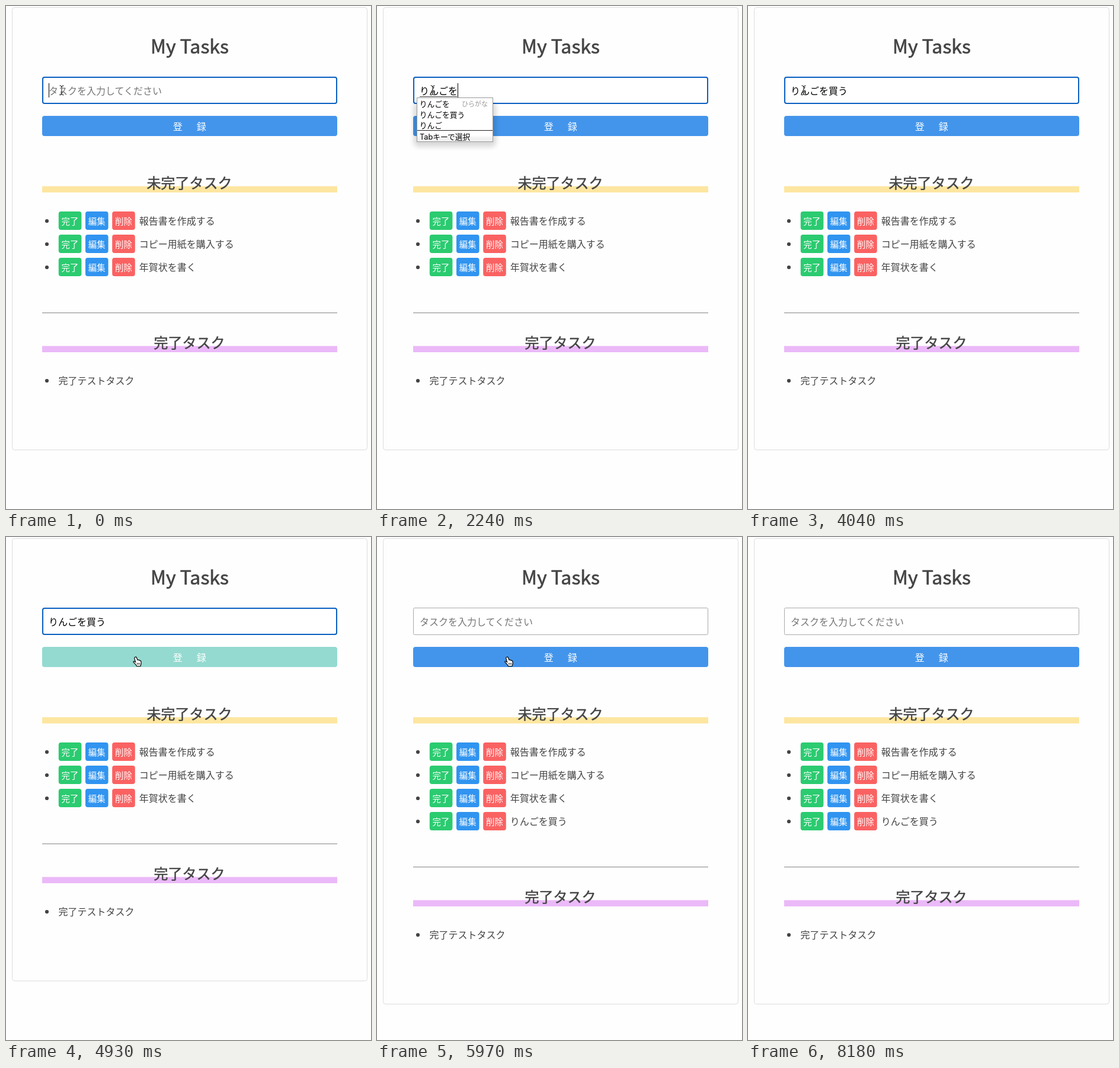
Animation of 616x847 px, one loop 9220 ms. Source, as an HTML page:

```html
<!DOCTYPE html>
<html lang="ja">
<head>
<meta charset="utf-8">
<title>My Tasks</title>
<style>
html, body { margin: 0; width: 100%; height: 100%; overflow: hidden; background: #fefefe; }
svg { display: block; width: 616px; height: 847px; }
text { font-family: "Noto Sans CJK JP", "Noto Sans CJK", sans-serif; font-size: 16px; fill: #444; white-space: pre; }
.h1, .h2 { text-anchor: middle; stroke: #444; }
.h1 { font-size: 32px; stroke-width: .7px; }
.h2 { font-size: 24px; stroke-width: .5px; }
.white { fill: #fff; }
.small { font-size: 14.4px; }
.pop { font-family: Inter, "Noto Sans CJK JP", "Noto Sans CJK", sans-serif; font-size: 12.75px; fill: #000; }
.note { font-size: 11px; fill: #999; }
</style>
</head>
<body>
<svg id="stage" viewBox="0 0 616 847">
  <defs>
    <filter id="blur" x="-20%" y="-40%" width="140%" height="180%"><feGaussianBlur stdDeviation="4"/></filter>
    <linearGradient id="sheet" x2="0" y2="1">
      <stop offset=".85" stop-color="#fff"/><stop offset=".92" stop-color="#f1f1f1"/>
    </linearGradient>
    <g id="beam" fill="none">
      <path d="M-3.5-8Q0-8 0-5.5Q0-8 3.5-8M0-6V6M-3.5 8Q0 8 0 5.5Q0 8 3.5 8M-2 3H2" stroke="#fff" stroke-width="2.4" opacity=".7"/>
      <path d="M-3.5-8Q0-8 0-5.5Q0-8 3.5-8M0-6V6M-3.5 8Q0 8 0 5.5Q0 8 3.5 8M-2 3H2" stroke="#111"/>
    </g>
    <g id="hand">
      <path d="M4 1.2c1.2-.6 2 0 2.4 1L8 6c.8-.6 1.8-.3 2 .4.8-.4 1.6 0 1.9.7.9-.2 1.7.3 1.9 1.2.4 1.6.5 3 .1 4.8-.3 1-.8 1.5-.9 3.4H6.5c-.5-1.6-1.6-2.6-2.6-3.8C2.8 11.6 1.8 10.6 1 9.6c-.6-1 .6-1.9 1.7-1.2L4.5 9.6 2.8 3.4C2.5 2.4 3.1 1.5 4 1.2Z" fill="#fff" stroke="#000" stroke-width="1.2"/>
      <path d="M7.4 11v3M9.4 11v3M11.4 11v3" stroke="#000" stroke-width=".8"/>
    </g>
    <g id="arrow">
      <path d="M1 2V16L4 13.2 6.2 18.2 8.8 17 6.6 12.4H11Z" opacity=".2"/>
      <path d="M.5.5V14.6L3.7 11.7 5.9 16.9 8.5 15.8 6.3 10.8H10.4Z" stroke="#fff"/>
    </g>
  </defs>
  <rect width="616" height="847" fill="#fefefe"/>
  <rect id="card" x="10.5" y="2.5" width="599" rx="4" fill="none" stroke="#ddd"/>
  <text class="h1" x="310" y="80">My Tasks</text>
  <rect id="field" fill="#fff"/>
  <text id="entry" x="72" y="148.5"></text>
  <path id="under" stroke="#444"/>
  <path id="caret" stroke="#000"/>
  <rect id="button" x="61" y="185" width="498" height="34" rx="4"/>
  <text class="white" x="281.7" y="208.5">登</text>
  <text class="white" x="321.7" y="208.5">録</text>
  <rect x="61" y="303.5" width="498" height="10.5" fill="#fde6a0"/>
  <text class="h2" x="309.5" y="307">未完了タスク</text>
  <g id="list"></g>
  <g id="done">
    <path d="M61 516.5H559" stroke="#999"/>
    <path d="M61 517.5H559" stroke="#e4e4e4"/>
    <rect x="61" y="572.5" width="498" height="10.5" fill="#ebb9f8"/>
    <text class="h2" x="309.5" y="576">完了タスク</text>
    <circle cx="69" cy="631" r="3.1" fill="#444"/>
    <text x="88.5" y="636.7">完了テストタスク</text>
  </g>
  <g id="popup"></g>
  <use id="cursor"/>
</svg>
<script>
const LOOP = 9220, ROW = 39;
const HINT = 'タスクを入力してください';
const $ = id => document.getElementById(id);
const set = (id, attrs) => {
  for (const k in attrs) $(id).setAttribute(k, attrs[k]);
};

// Each track is a list of [start time, value...], held until the next start.
const typed = [
  [0, ''], [150, 'ｒ'], [450, 'り'], [900, 'りｎ'], [1040, 'りん'],
  [1790, 'りんｇ'], [1940, 'りんご'], [2090, 'りんごｗ'], [2240, 'りんごを'],
  [2540, 'りんごをｋ'], [2690, 'りんごをか'], [2840, 'りんごをかう'],
  [2990, 'りんごを買う'], [5970, '']
];
const popups = [
  [0, null],
  [150, { right: 196, rows: ['りんごを', 'りんご', '料理'] }],
  [900, { right: 231, noteX: 156, rows: ['りんごを', 'りんごを買う', 'リンク'], notes: ['ひらがな', '', '[全] カタカナ'] }],
  [1790, { right: 196, noteX: 143, rows: ['りんごを', 'りんごを買う', 'りんご'], notes: ['ひらがな'] }],
  [2540, { right: 247, noteX: 194, rows: ['りんごを買うと', 'りんごを買うで', 'りんごを買うで表示'], notes: ['ひらがな'] }],
  [2990, null]
];
const carets = [[0, 1], [4040, 0], [4490, 1], [4930, 0]];
const hovers = [[0, 0], [4640, .3], [4790, .8], [4930, 1], [5970, 0]];
const cursors = [
  [0, 'beam', 94, 142], [4340, 'beam', 104, 147], [4490, 'beam', 135, 158],
  [4640, 'hand', 180, 188], [4790, 'hand', 206, 199], [4930, 'hand', 214, 201],
  [5080, 'hand', 215, 201], [6420, 'arrow', 285, 318], [6560, 'arrow', 346, 418],
  [6710, 'arrow', 342, 442], [6850, 'arrow', 326, 463], [7000, 'arrow', 306, 480],
  [7140, 'arrow', 288, 491], [7290, 'arrow', 273, 498], [7430, 'arrow', 264, 500],
  [7580, 'arrow', 256, 500], [7880, 'arrow', 330, 540], [8030, 'arrow', 547, 672],
  [8180, '', 0, 0]
];
const at = (track, t) => track.findLast(step => step[0] <= t);

const mix = (a, b, k) => `rgb(${a.map((v, i) => Math.round(v + (b[i] - v) * k))})`;

const chip = (label, color, i, y) =>
  `<rect x="${88.8 + i * 45.2}" y="${y - 16}" width="38.6" height="31" rx="4" fill="${color}"/>
   <text class="white small" x="${93.6 + i * 45.2}" y="${y + 5.5}">${label}</text>`;

const task = (name, i) => {
  const y = 362 + i * ROW;
  return `<g><circle cx="69" cy="${y}" r="3.1" fill="#444"/>
    ${chip('完了', '#2bcb70', 0, y)}${chip('編集', '#3094f0', 1, y)}${chip('削除', '#fa6262', 2, y)}
    <text x="224.7" y="${y + 5.7}">${name}</text></g>`;
};

function popup({ right, rows, noteX, notes = [] }) {
  const w = right - 67;
  const line = (s, x, y, cls = '') => `<text class="pop ${cls}" x="${x}" y="${y}">${s}</text>`;
  return `<rect x="62" y="162" width="${w + 10}" height="75" rx="8" opacity=".15" filter="url(#blur)"/>
    <rect x="67.5" y="154.5" width="${w - 1}" height="74" fill="url(#sheet)" stroke="#999"/>
    ${rows.map((s, i) => line(s, 71.7, 169.5 + i * 18)).join('')}
    ${notes.map((s, i) => line(s, noteX, 168.5 + i * 18, 'note')).join('')}
    <path d="M68 209.5H${right - 1}" stroke="#222"/>
    ${line('Tabキーで選択', 72, 225)}`;
}

$('list').innerHTML = ['報告書を作成する', 'コピー用紙を購入する', '年賀状を書く', 'りんごを買う'].map(task).join('');
let shown = null;

function draw(t) {
  const text = at(typed, t)[1];
  const added = t >= 5970;
  const focus = t < 5530;
  const end = 72 + text.length * 16;

  set('card', { height: added ? 784 : 745 });
  set('field', focus
    ? { x: 62, y: 120, width: 496, height: 44, rx: 3, stroke: '#0a5fc0', 'stroke-width': 2 }
    : { x: 61.5, y: 119.5, width: 497, height: 45, rx: 2, stroke: '#aaa', 'stroke-width': 1 });
  $('entry').textContent = text || HINT;
  $('entry').style.fill = text ? '#000' : '#757575';
  set('under', { d: t < 3440 && text ? `M72 152.5H${end - 1}` : '' });
  set('caret', { d: focus && at(carets, t)[1] ? `M${end + .5} 130V154` : '' });
  set('button', { fill: mix([67, 149, 235], [148, 218, 208], at(hovers, t)[1]) });
  $('list').lastElementChild.style.display = added ? '' : 'none';
  set('done', { transform: `translate(0 ${added ? ROW : 0})` });

  const pop = at(popups, t)[1];
  if (pop !== shown) {
    $('popup').innerHTML = pop ? popup(pop) : '';
    shown = pop;
  }
  const [, kind, x, y] = at(cursors, t);
  set('cursor', { href: kind ? '#' + kind : '', transform: `translate(${x} ${y})` });
  $('cursor').style.display = kind ? '' : 'none';
}

const start = performance.now();
function tick() {
  draw((performance.now() - start) % LOOP);
  requestAnimationFrame(tick);
}
tick();
</script>
</body>
</html>
```
